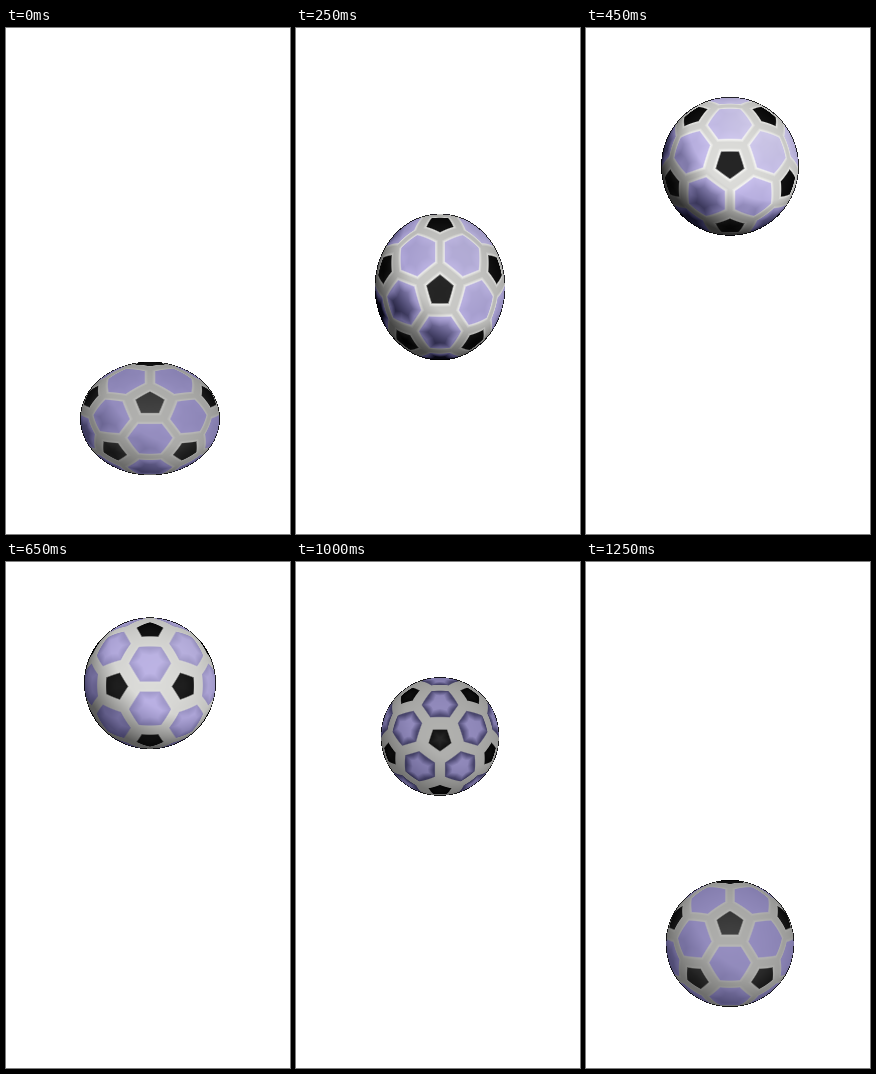
These frames come from a looping animation (284 px wide and 506 px high, 1300 ms). An HTML page with a canvas:

```html
<!DOCTYPE html>
<html lang="en">
<head>
<meta charset="utf-8">
<title>Bouncing ball</title>
<style>
  html, body { margin: 0; width: 100%; height: 100%; overflow: hidden; background: #fff; }
  canvas { display: block; }
</style>
</head>
<body>
<canvas id="stage" width="284" height="506"></canvas>
<script>
const ctx = document.getElementById('stage').getContext('2d');
const W = 284, H = 506, LOOP = 1300, STEP = 50, CX = 144, SIZE = 152;
const APEX_Y = 120.5, DROP = 270, RISE = 550, FALL = 600;
const TAKEOFF = 250, LANDING = 1250;

const clamp = v => v < 0 ? 0 : v > 1 ? 1 : v;
const wave = (t, peak) => Math.cos(2 * Math.PI * (t - peak) / LOOP);

// Soft bump around a moment of the loop
function pulse(t, mid, width) {
  const d = Math.abs(t - mid), near = Math.min(d, LOOP - d);
  return Math.exp(-((near / width) ** 2));
}

function centreY(t) {
  if (t < RISE) {
    const u = Math.pow(t / RISE, .9);
    return APEX_Y + DROP * (1 + Math.cos(Math.PI * u)) / 2;
  }
  const v = Math.max(0, t - FALL) / 400, rush = Math.max(0, v - 1);
  return APEX_Y + Math.min(DROP, 54 * v * v + 303 * rush * rush);
}

// Spins up slightly in flight, drags while on the ground; one turn per loop.
function spin(t) {
  const flight = 339, drag = 360 - flight;
  if (t >= TAKEOFF && t < LANDING) {
    const s = (t - TAKEOFF) / (LANDING - TAKEOFF);
    return -2.8 - flight * (.83 * s + .17 * s * s);
  }
  const g = ((t - LANDING + LOOP) % LOOP) / (LOOP - LANDING + TAKEOFF);
  return -2.8 - flight - drag * Math.pow(g, 1.2);
}

function pose(t) {
  const contact = pulse(t, 1280, 90);
  const r = 64.2 + 5 * wave(t, 400) + 3 * contact;
  const stretch = 1 - .13 * pulse(t, 0, 30) + .08 * pulse(t, TAKEOFF, 120);
  const bump = .05 + .58 * wave(t, 260);
  return {
    cy: centreY(t),
    rx: r / Math.sqrt(stretch),
    ry: r * stretch,
    turn: spin(t) * Math.PI / 180,
    light: .855 + .125 * wave(t, 470),
    shadow: .25 + .5 * pulse(t, 420, 300),
    gloss: .4 * pulse(t, 420, 200),
    grey: .15 + .12 * contact,
    rim: .25 * clamp(bump + .2),
    bump
  };
}

// Panels of a truncated icosahedron: 12 pentagons, then 20 hexagons.
const PHI = (1 + Math.sqrt(5)) / 2, SIGNS = [-1, 1];
const PENT = .9393, HEX = .9149;
const panels = [];
function addPanel(x, y, z, dist) {
  const k = Math.hypot(x, y, z) * dist;
  panels.push([x / k, y / k, z / k]);
}
function addCyclic(a, b, dist) {
  for (const s of SIGNS) for (const r of SIGNS) {
    addPanel(0, s * a, r * b, dist);
    addPanel(s * a, r * b, 0, dist);
    addPanel(r * b, 0, s * a, dist);
  }
}
addCyclic(1, PHI, PENT);
addCyclic(PHI, 1 / PHI, HEX);
for (const x of SIGNS) for (const y of SIGNS) for (const z of SIGNS) addPanel(x, y, z, HEX);

const TILT = Math.atan(1 / PHI);
const WHITE = [235, 235, 232], LILAC = [198, 188, 240];
const image = ctx.createImageData(SIZE, SIZE);

function draw(t) {
  const { cy, rx, ry, turn, light, shadow, gloss, grey, rim, bump } = pose(t);
  const ca = Math.cos(turn + TILT), sa = Math.sin(turn + TILT);
  const left = CX - SIZE / 2, top = Math.round(cy - SIZE / 2);
  const px = image.data;
  px.fill(255);

  for (let j = 0; j < SIZE; j++) for (let i = 0; i < SIZE; i++) {
    const x = (left + i + .5 - CX) / rx, y = (cy - top - j - .5) / ry;
    const rr = x * x + y * y;
    if (rr > 1) continue;
    const z = Math.sqrt(1 - rr);
    const by = y * ca - z * sa, bz = y * sa + z * ca;

    // nearest three panels
    let k1 = -9, k2 = -9, k3 = -9, id = 0;
    for (let p = 0; p < panels.length; p++) {
      const c = panels[p], k = c[0] * x + c[1] * by + c[2] * bz;
      if (k > k1) { k3 = k2; k2 = k1; k1 = k; id = p; }
      else if (k > k2) { k3 = k2; k2 = k; }
      else if (k > k3) k3 = k;
    }
    const isPent = id < 12;
    const inset = (isPent ? .075 : .057) + Math.max(0, -bump) * .02;
    const edge = k1 - k2 - inset;
    const inside = clamp(edge / .016 + .5);
    const depth = clamp((edge - .3 * (k2 - k3)) / .09);

    const facing = .5 * x + .6 * y + .62 * z;
    const shade = clamp(.5 - 1.25 * facing);
    const lum = light * (1 - shadow * shade) * (.82 + .18 * z);
    const shine = gloss * clamp(facing) ** 2;

    const seam = lum * (1 + rim * (clamp(1 + edge / .035) - .3));
    const relief = bump < 0 ? 1 + bump * (1 - depth)
                            : 1 - bump * depth * (.1 + 1.3 * shade);
    const black = 255 * grey * (.15 + .85 * z * z) * relief;
    const outline = rr > .977 ? .2 : 1;

    const o = (j * SIZE + i) * 4;
    for (let c = 0; c < 3; c++) {
      const lilac = LILAC[c] * Math.pow(lum * relief, c === 2 ? .8 : 1);
      const fill = isPent ? black : lilac + (240 - lilac) * shine;
      const base = Math.min(245, WHITE[c] * seam);
      px[o + c] = (base + (fill - base) * inside) * outline;
    }
  }
  ctx.fillStyle = '#fff';
  ctx.fillRect(0, 0, W, H);
  ctx.putImageData(image, left, top);
}

const start = performance.now();
let last = -1;
function tick() {
  const t = Math.floor((performance.now() - start) % LOOP / STEP) * STEP;
  if (t !== last) draw(last = t);
  requestAnimationFrame(tick);
}
tick();
</script>
</body>
</html>
```
